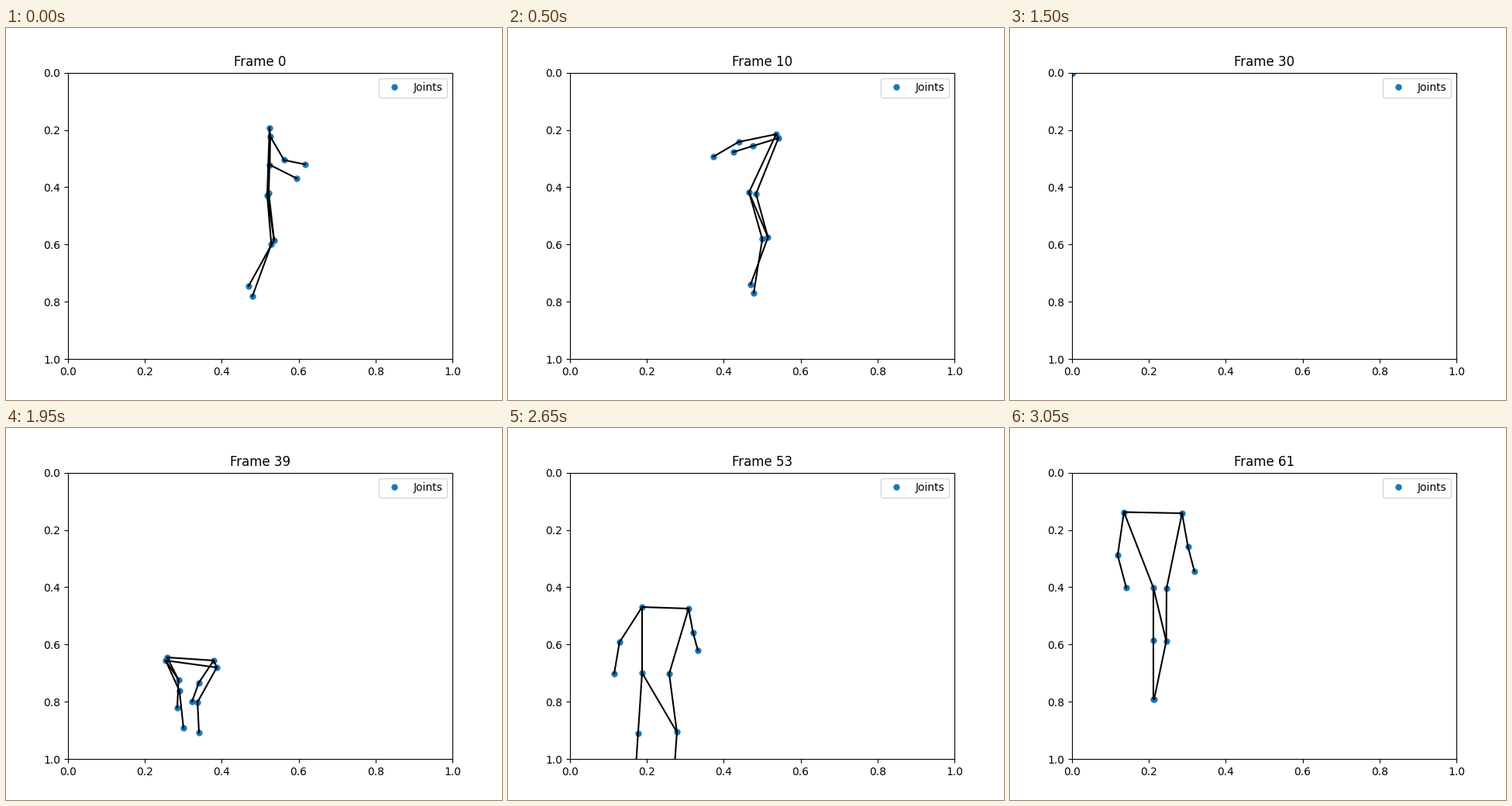
Animation of 640x480 px, one loop 3100 ms. Source, as a matplotlib script:

```python
import numpy as np
import matplotlib.pyplot as plt
from matplotlib.animation import FuncAnimation

FRAMES, INTERVAL = 62, 50
LEFT, TOP, WIDTH, HEIGHT = 80, 57.6, 496, 369.6  # axes box in pixels

# Joints of one side, each hanging from its parent
HIP, SHOULDER, ELBOW, HAND, KNEE, FOOT = range(6)
PARENT = [HIP, HIP, SHOULDER, ELBOW, HIP, KNEE]


def middle(root, end, share, bend):
    """Elbow or knee: a share of the way along, pushed out sideways."""
    return root + (end - root) * (share + 1j * bend)


def side(hip, shoulder, hand, foot, elbow, knee):
    """Angles and lengths of one side's bones; the hip stays a position."""
    pts = np.array([hip, shoulder, middle(shoulder, hand, 0.57, elbow), hand,
                    middle(hip, foot, 0.47, -knee), foot])
    bones = pts - pts[PARENT]
    rig = np.stack([np.angle(bones), np.abs(bones)], axis=-1)
    rig[HIP] = hip.real, hip.imag
    return rig


def pose(near, far, elbow=0.1, knee=0.0):
    return np.array([side(*near, elbow, knee),
                     side(*far, elbow - 0.08, knee + 0.05)])


def swing(rig, degrees, shift=(0, 0)):
    """Turn both arms about the shoulders and move the whole body."""
    out = rig.copy()
    out[:, [ELBOW, HAND], 0] += np.radians(degrees)
    out[:, HIP] += shift
    return out


def joints(rig):
    pts = rig[..., 1] * np.exp(1j * rig[..., 0])
    pts[:, HIP] = rig[:, HIP, 0] + 1j * rig[:, HIP, 1]
    for joint in range(SHOULDER, FOOT + 1):
        pts[:, joint] += pts[:, PARENT[joint]]
    return (pts.real - LEFT) / WIDTH, (pts.imag - TOP) / HEIGHT


class Take:
    """Smooth cubic motion through timed poses."""

    def __init__(self, keys):
        self.times = np.array(list(keys), float)
        self.rigs = np.stack(list(keys.values()))
        angles = self.rigs[:, :, SHOULDER:, 0]
        angles[:] = np.unwrap(angles, axis=0)
        self.slopes = np.gradient(self.rigs, self.times, axis=0)

    def at(self, t):
        i = np.searchsorted(self.times[1:-1], t, side="right")
        h = self.times[i + 1] - self.times[i]
        u = (t - self.times[i]) / h
        ease = u * u * (3 - 2 * u)
        return ((1 - ease) * self.rigs[i] + ease * self.rigs[i + 1]
                + h * u * (1 - u) * ((1 - u) * self.slopes[i]
                                     - u * self.slopes[i + 1]))


# Each side: hip, shoulder, hand, foot
stand = pose((337 + 216j, 340 + 129j, 375 + 194j, 318 + 346j),
             (339 + 213j, 341 + 140j, 386 + 176j, 313 + 333j), 0.3, 0.11)
squat = pose((311 + 212j, 346 + 137j, 265 + 166j, 317 + 342j),
             (320 + 214j, 349 + 142j, 291 + 160j, 313 + 331j), 0.08, 0.11)
crouch = pose((206 + 300j, 272 + 309j, 249 + 393j, 229 + 387j),
              (208 + 296j, 268 + 300j, 240 + 353j, 221 + 361j), 0.14, 0.08)
rise = pose((173 + 316j, 173 + 231j, 137 + 317j, 162 + 482j),
            (208 + 317j, 233 + 233j, 245 + 287j, 212 + 478j))
upright = pose((185 + 206j, 147 + 108.5j, 150 + 206j, 185 + 350j),
               (202 + 207j, 222 + 110j, 238 + 185j, 186 + 350j))

takeoff = Take({0: stand, 10: squat, 11: swing(squat, 15, (-7, -1)),
                14: swing(stand, 20), 16: swing(stand, 0, (-8, -15))})
landing = Take({32: swing(crouch, -80, (22, 35)), 39: crouch, 53: rise,
                57: swing((rise + upright) / 2, 15), 61: upright})


def body(n):
    if 17 <= n < 32 or 43 <= n < 47:  # tracking lost
        return np.zeros((2, 2, 6))
    return joints((takeoff if n < 17 else landing).at(n))


fig, ax = plt.subplots(figsize=(6.4, 4.8), dpi=100)
ax.set_xlim(0, 1)
ax.set_ylim(1, 0)
dots, = ax.plot([], [], "o", markersize=5, label="Joints")
title = ax.set_title("Frame 0")
ax.legend(loc="upper right")

# Limbs of both sides, the shoulder line, and near hip to far knee
edges = [((s, j), (s, PARENT[j])) for s in (0, 1) for j in range(1, 6)]
edges += [((0, SHOULDER), (1, SHOULDER)), ((0, HIP), (1, KNEE))]
lines = [ax.plot([], [], "k-", lw=1.5)[0] for _ in edges]


def update(n):
    x, y = body(n)
    dots.set_data(x.ravel(), y.ravel())
    for line, (a, b) in zip(lines, edges):
        line.set_data([x[a], x[b]], [y[a], y[b]])
    title.set_text(f"Frame {n}")
    return [dots, title, *lines]


anim = FuncAnimation(fig, update, frames=FRAMES, interval=INTERVAL,
                     repeat=True, repeat_delay=0)
plt.show()
```
